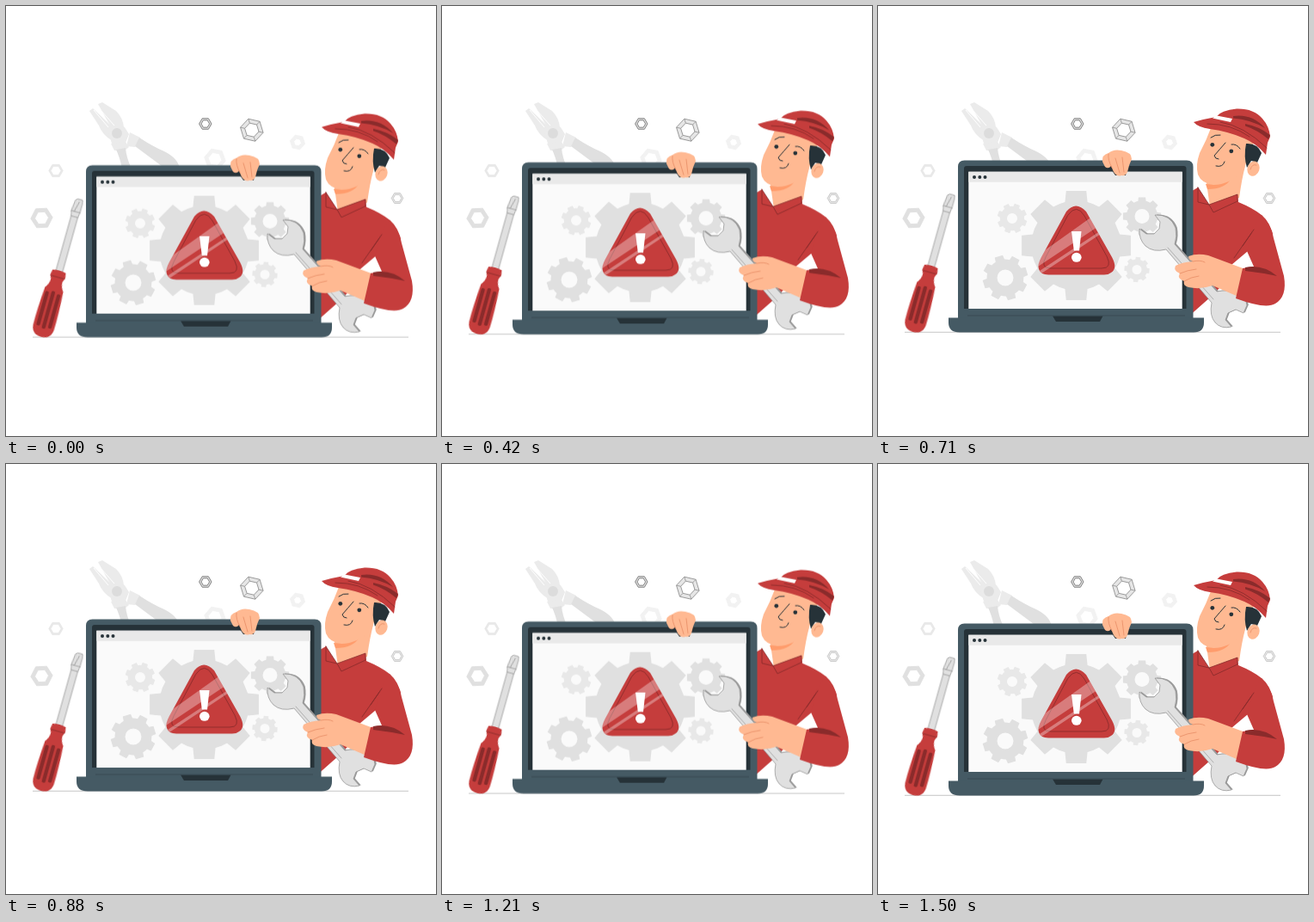
Write an HTML page that moves like this. It is 500x500 px and loops after 1540 ms.

```html
<!DOCTYPE html>
<html lang="en">
<head>
<meta charset="utf-8">
<title>Repair service</title>
<style>
html, body { margin: 0; width: 100%; height: 100%; overflow: hidden; background: #fff; }
svg { display: block; width: 100vw; height: 100vh; }
#scene { animation: bob 1540ms linear -40ms infinite; }
@keyframes bob { 0%, 100% { transform: translateY(0); } 50% { transform: translateY(-6.2px); } }
.red { fill: #c53d3c; }
.dark { fill: #8a2b2b; }
.skin { fill: #ffb992; }
.ink { fill: #263238; }
.slate { fill: #455a64; }
.steel { fill: #e0e0e0; stroke: #8f8f8f; stroke-width: .7; stroke-linejoin: round; }
.seam, .fold, .pen { fill: none; stroke-linecap: round; stroke-linejoin: round; stroke-width: .8; }
.seam { stroke: #842a2a; }
.fold { stroke: #e88d66; }
.pen { stroke: #263238; stroke-width: 1; }
</style>
</head>
<body>
<svg viewBox="0 0 500 500">
  <defs>
    <path id="tri" d="M219 245Q230 232 242 245L272 298Q279 311 271 316Q268 318.5 263 318.5H198Q189 318.5 187 312Q185 307 190 298Z"/>
    <clipPath id="triClip"><use href="#tri"/></clipPath>
    <path id="wrench" d="M322 249Q340 248 346 264Q348 274 345 283L394 338Q406 335 418 340Q428 344 429 354L425 363L416 359L407 363L404 371L411 379Q399 382 392 374Q385 366 388 351L335 289Q320 293 311 285Q303 277 304 265L312 271L321 271L327 265L328 257Z"/>
  </defs>

  <g id="nuts"></g>

  <g fill="#ebebeb">
    <path d="M97 122L101 119L123 140L124 157Q112 150 108 139Z"/>
    <path d="M107 114L112 112L128 122Q136 130 137 141L130 148L121 139Z"/>
    <path d="M118 142Q126 133 138 141L143 149L137 164L123 160Z"/>
    <path d="M122 160L139 158L143 164L138 168H126Z"/>
    <path d="M144 147L156 153L150 164L140 163Z"/>
    <path fill="#e0e0e0" d="M128 167L139 165Q140 177 146 189H135Q132 175 128 167Z"/>
    <path fill="#e0e0e0" d="M155 153Q170 163 184 169Q200 177 202 189H185L150 163Z"/>
    <circle cx="129" cy="148" r="6" fill="#dcdcdc"/>
    <path d="M110 121L126 139M102 121L119 141" stroke="#fff" stroke-width="1" fill="none"/>
  </g>

  <g id="scene">
    <path d="M31 385.3H468" stroke="#b5b5b5" stroke-width=".8"/>

    <g transform="translate(40.600 385) rotate(15.600)">
      <path class="steel" d="M-4 -74V-145L-5.500 -151L-4 -164L-2 -166H4L5 -162V-151L4 -145V-74Z"/>
      <path class="pen" style="stroke:#8f8f8f;stroke-width:.7" d="M-4 -145H4M-5 -151H5M-2 -151L1 -163"/>
      <path class="red" d="M-8 -79Q0 -81 8 -79L9 -73L7 -68Q7 -62 11 -57Q13 -30 12.500 -11Q11 0 0 0Q-11 0 -12.500 -11Q-13 -30 -11 -57Q-7 -62 -7 -68L-9 -73Z"/>
      <path d="M-7 -51V-14M0 -53V-12M7 -51V-14" stroke="#8a2b2b" stroke-width="4.400" stroke-linecap="round"/>
      <path class="seam" d="M-8 -72H8"/>
    </g>

    <!-- worker -->
    <path class="skin" d="M381 205L427 192Q423 207 420 229L386 240Z"/>
    <path fill="#ff9c6c" d="M381 213Q397 215 411 206Q404 219 383 219Z"/>
    <path class="red" d="M360 224L372 217L385 237L418 225L419 234Q436 241 446 249Q455 258 459 271L440 296L420 311L386 345L360 368Z"/>
    <path class="skin" d="M387 148Q382 162 374 177Q369 191 372 202Q376 212 390 214Q409 214 425 197L437 164L410 147Z"/>
    <path class="ink" d="M428 166Q441 165 446 177L441 188L434 186L429 194Q425 181 428 166Z"/>
    <ellipse class="skin" cx="436.500" cy="195" rx="7" ry="8.800" transform="rotate(18 436 195)"/>
    <path class="fold" d="M433 196Q435 189 440 191"/>
    <circle class="ink" cx="388.800" cy="167.300" r="2.400"/>
    <circle class="ink" cx="410.800" cy="174.800" r="2.400"/>
    <path class="pen" d="M387 159Q392 155 398 156M411 167Q417 166 421 172" stroke-width="1.200"/>
    <path class="pen" d="M404 165Q397 173 391 180Q392 184 396 184M393 192Q401 194 403 187"/>
    <path class="red" d="M367 141Q381 137 393 135Q399 127 417 125.500Q437 125 447 137Q455 146 456 158L453 165L451 179Q440 166 426 160Q408 152 386 149Q372 147 367 141Z"/>
    <path class="dark" d="M413 134Q435 131 450 148Q433 138 413 136.500ZM427 143Q443 146 456 156L454 161Q441 150 427 145.500Z"/>
    <path class="seam" d="M398 141Q425 145 452 171M383 143Q411 143 432 158"/>
    <path fill="#fff" d="M394 133.500L412 137L410 141L389 136.500Z"/>
    <path class="seam" d="M372 217V234L385 237L390 246L418 233V225L385 237L372 217M437 266L414 299"/>

    <!-- laptop -->
    <path class="slate" d="M93 369V193Q93 185.500 100.500 185.500H359Q366.500 185.500 366.500 193V369Z"/>
    <path class="ink" d="M100 358V195Q100 192 103 192H355.500Q358.500 192 358.500 195V358Z"/>
    <path fill="#fafafa" d="M105.300 198.700H353.700V358H105.300Z"/>
    <path fill="#e9e9e9" d="M105.300 198.700H353.700V210.700H105.300Z"/>
    <g class="ink"><circle cx="112" cy="205" r="2"/><circle cx="118.300" cy="205" r="2"/><circle cx="124.500" cy="205" r="2"/></g>
    <path class="slate" d="M82 368.500H379V374Q379 385.500 367 385.500H95Q82 385.500 82 374Z"/>
    <path class="ink" d="M203 366.500H261.500L258 373H207Z"/>
    <path d="M104 366H357" stroke="#37474f" stroke-width=".8"/>

    <g id="gears"></g>

    <use href="#tri" class="red"/>
    <path class="seam" d="M221 249Q231 235 240 250L266 297Q273 311 260 311H201Q188 311 195 298Z"/>
    <g clip-path="url(#triClip)" fill="#fff" opacity=".33">
      <path d="M180 300L253 248L261 259L180 313Z"/>
      <path d="M182 318L264 264L265 267L184 321Z"/>
    </g>
    <path fill="#fff" d="M225 268H236.500L234 290.500H227.800Z"/>
    <ellipse fill="#fff" cx="230.800" cy="298.300" rx="5.800" ry="5.500"/>

    <!-- hand on the lid -->
    <path class="ink" d="M267 190L276 203H288L290 193Z"/>
    <path class="skin" d="M261 187Q260 179 268 177Q274 172 283 174Q295 176 295 184Q292 190 290 199Q288 204 283 203Q278 205 274 199L271 192Q268 196 264 193Z"/>
    <path class="fold" d="M268 178Q267 185 272 194M276 183L281 200M284 182L286 199"/>

    <!-- wrench and arm -->
    <use href="#wrench" fill="#9b9b9b" transform="translate(1.800 -.4)"/>
    <use href="#wrench" class="steel"/>
    <path class="pen" style="stroke:#b0b0b0" d="M337 287L390 347"/>
    <path fill="#fff" d="M430 291L438 310L424 313L411 307Z"/>
    <path class="skin" d="M361 297Q371 293 384 296L427 312L419 344L389 331Q375 336 361 333Q354 331 356 326Q347 323 351 317Q343 314 346 308Q353 304 366 303Q361 301 361 297Z"/>
    <path class="fold" d="M351 317Q360 313 370 312M356 326Q364 321 373 320M366 303Q375 301 380 304"/>
    <path class="red" d="M446 249Q457 258 460 276L472 320Q476 344 462 352Q451 359 416 346L424 311L437 309L429 291L436 264Z"/>
    <path class="dark" d="M427 310Q447 306 464 320Q445 316 427 314Z"/>
    <path class="seam" d="M437 266L424 285"/>
  </g>
</svg>
<script>
const NS = 'http://www.w3.org/2000/svg';
const polar = (cx, cy, r, deg) => {
  const a = deg * Math.PI / 180;
  return (cx + r * Math.cos(a)).toFixed(2) + ' ' + (cy + r * Math.sin(a)).toFixed(2);
};
function add(id, d, attrs) {
  const p = document.createElementNS(NS, 'path');
  p.setAttribute('d', d);
  for (const k in attrs) p.setAttribute(k, attrs[k]);
  document.getElementById(id).append(p);
}
const ring = (cx, cy, r) =>
  `M${cx - r} ${cy}a${r} ${r} 0 1 0 ${2 * r} 0a${r} ${r} 0 1 0 ${-2 * r} 0Z`;
const hex = (cx, cy, r, turn) =>
  'M' + Array.from({ length: 6 }, (_, i) => polar(cx, cy, r, turn + i * 60)).join('L') + 'Z';

function gear(cx, cy, r, hole, fill, turn = 0) {
  const root = r * 0.81;
  let d = '';
  for (let i = 0; i < 8; i++) {
    const a = turn + i * 45;
    d += (i ? `A${root} ${root} 0 0 1 ` : 'M') + polar(cx, cy, root, a - 14.5);
    d += [[r, -10.5], [r, 10.5], [root, 14.5]].map(([q, b]) => 'L' + polar(cx, cy, q, a + b)).join('');
  }
  d += 'Z' + (hole ? ring(cx, cy, hole) : '');
  add('gears', d, { fill, 'fill-rule': 'evenodd' });
}
gear(230.5, 284.5, 64.5, 0, '#e0e0e0');
gear(156, 253, 17.5, 6, '#e8e8e8', 20);
gear(307, 250.5, 22.5, 8.5, '#e0e0e0');
gear(301, 312.5, 14.8, 5.5, '#e8e8e8', 6);
gear(148, 322, 26.5, 9.5, '#e0e0e0', 28);

function nut(cx, cy, r, inner, fill, turn, line) {
  add('nuts', hex(cx, cy, r, turn) + hex(cx, cy, inner, turn), {
    fill, 'fill-rule': 'evenodd', stroke: line || fill, 'stroke-width': 0.9, 'stroke-linejoin': 'round'
  });
}
nut(58, 191.5, 8.2, 6, '#e8e8e8', 0);
nut(41.5, 246.5, 12.7, 8, '#e0e0e0', -3);
nut(231.8, 137, 7.2, 4.8, '#e0e0e0', 0, '#777');
nut(285.8, 144.2, 13.6, 8.4, '#e6e6e6', 13, '#909090');
nut(339, 158.5, 8.8, 4.5, '#f2f2f2', 12);
nut(243, 178, 12.5, 8, '#f2f2f2', 10);
nut(455, 223.5, 6.8, 4.8, '#ebebeb', 0, '#c4c4c4');

let facets = '';
for (let a = 13; a < 373; a += 60) {
  facets += 'M' + polar(285.8, 144.2, 8.4, a) + 'L' + polar(285.8, 144.2, 13.6, a);
}
add('nuts', facets, { stroke: '#909090', 'stroke-width': 0.8 });
</script>
</body>
</html>
```
